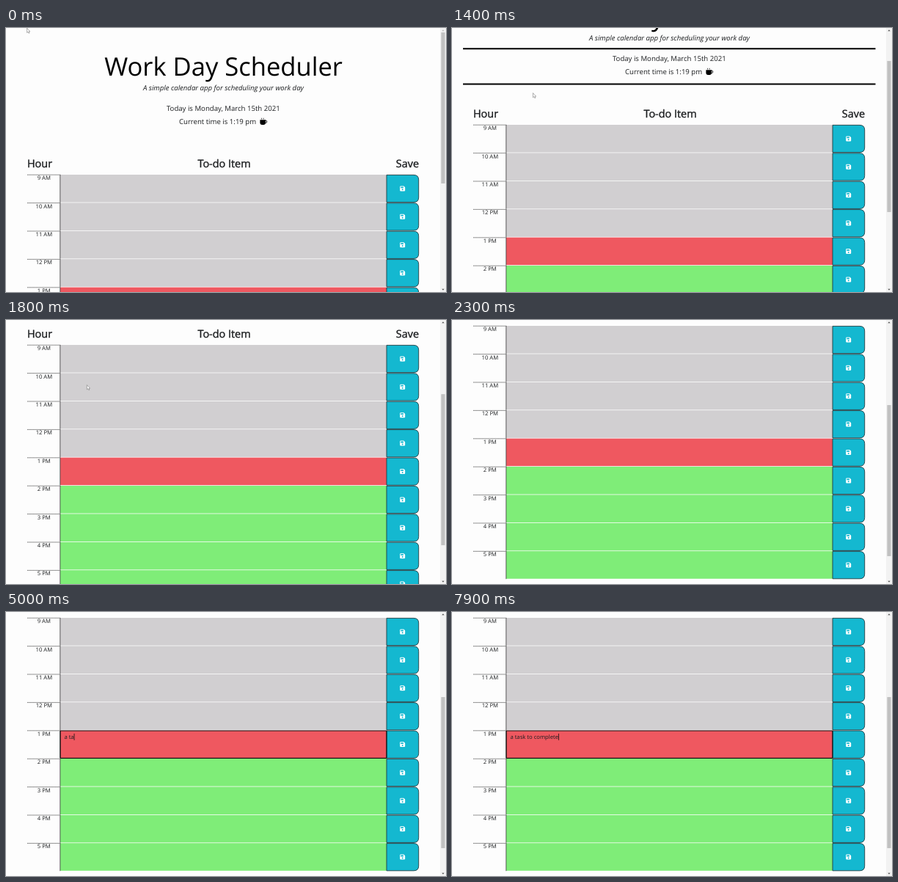
Write an HTML page that moves like this. It is 600 px wide and 360 px high and loops after 8000 ms.

```html
<!DOCTYPE html>
<html lang="en">
<head>
<meta charset="utf-8">
<title>Work Day Scheduler</title>
<style>
  html, body { margin: 0; width: 100%; height: 100%; overflow: hidden; background: #fdfdfd; }
  svg { display: block; width: 600px; height: 360px; }
  text { font-family: "Open Sans", sans-serif; fill: #1c1e20; text-rendering: geometricPrecision; white-space: pre; }
  .mid { text-anchor: middle; }
  .head { font-size: 14.4px; stroke: #1c1e20; stroke-width: .4px; }
  .lead { font-size: 9.6px; }
  .small { font-size: 7.68px; }
</style>
</head>
<body>
<svg viewBox="0 0 600 360">
  <defs>
    <path id="disk" fill="#fff" fill-rule="evenodd"
      d="M1 0H5.2L7 1.8V6Q7 7 6 7H1Q0 7 0 6V1Q0 0 1 0ZM1 1V2.8H4.8V1ZM3.5 3.9A1 1 0 1 0 3.5 5.9A1 1 0 1 0 3.5 3.9Z"/>
  </defs>
  <rect width="600" height="360" fill="#fdfdfd"/>
  <g id="page">
    <text class="mid" x="296.5" y="65" font-size="34.56" style="fill:#000">Work Day Scheduler</text>
    <text class="mid lead" x="296.5" y="84.5" font-style="italic">A simple calendar app for scheduling your work day</text>
    <path id="rules" d="M15 96.2H577.5M15 144.4H577.5" stroke="#000" stroke-width="2"/>
    <text class="mid lead" x="296.3" y="113.3">Today is Monday, March 15th 2021</text>
    <text class="lead" x="236" y="130.6">Current time is 1:19 pm</text>
    <g id="mug">
      <path d="M346.4 125.2H354V129.6Q354 132 351.6 132H348.8Q346.4 132 346.4 129.6Z"/>
      <path d="M353.6 126.2H354.6Q355.6 126.2 355.6 127.2V128.2Q355.6 129.4 354.4 129.4H353.6" fill="none" stroke="#000"/>
      <path d="M348.6 124.4V122.8M351.2 124.4V122.8" stroke="#000" stroke-width=".8"/>
    </g>
    <text class="head" x="29" y="190">Hour</text>
    <text class="head mid" x="297.5" y="190">To-do Item</text>
    <text class="head" x="563" y="190" text-anchor="end">Save</text>
    <g id="rows"></g>
    <g id="focus">
      <rect x="74" y="354" width="445" height="37.3" rx=".8" fill="none" stroke="#151515" stroke-width="1.2"/>
      <path id="caret" d="M0 357.8V366.8" stroke="#111" stroke-width=".8"/>
    </g>
    <text id="task" class="small" x="79.4" y="364.9"></text>
  </g>
  <rect x="592" width="8" height="360" fill="#f2f2f2"/>
  <rect id="thumb" x="593.4" y="6" width="5.2" height="206" fill="#c1c1c1"/>
  <path id="up" d="M594.3 4.2L596 2.2L597.7 4.2Z"/>
  <path d="M594.3 355.8L596 357.8L597.7 355.8Z" fill="#555"/>
  <path id="mouse" d="M0 0V6.2L1.4 5L2.4 7L3.4 6.6L2.5 4.6H4.2Z" fill="#fff" stroke="#777" stroke-width=".6"/>
</svg>
<script>
const $ = id => document.getElementById(id);
const LOOP = 8000, STEP = 100, TOP = 200, PITCH = 38.4;
const GREY = '#d1cfd1', RED = '#ef5860', GREEN = '#7fed78', TEAL = '#14b8d0';

function row(i) {
  const y = TOP + i * PITCH, hour = 9 + i;
  const label = `${hour > 12 ? hour - 12 : hour} ${hour < 12 ? 'AM' : 'PM'}`;
  const fill = hour < 13 ? GREY : hour > 13 ? GREEN : RED;
  return `<path d="M29 ${y + .2}H74" stroke="#222" stroke-width=".7" stroke-dasharray="1.4 .6"/>
    <text class="small mid" x="51.8" y="${y + 7.2}">${label}</text>
    <rect x="74" y="${y}" width="445" height="${PITCH - .8}" fill="${fill}"/>
    <path d="M73.8 ${y}v${PITCH - .4}" stroke="#333" stroke-width=".8"/>
    <path d="M519 ${y + .4}H556Q562.7 ${y + .4} 562.7 ${y + 7}V${y + 31}Q562.7 ${y + 37.6} 556 ${y + 37.6}H519Z"
      fill="${TEAL}" stroke="#1d3a40" stroke-width=".9"/>
    <use href="#disk" x="537.2" y="${y + 15.4}"/>`;
}
$('rows').innerHTML = Array.from({ length: 9 }, (_, i) => row(i)).join('');

// [time, value] steps
const SCROLL = [[1000, 0], [1100, 25.2], [1200, 58], [1300, 64], [1400, 68], [1500, 100],
  [1600, 124], [1700, 134], [1800, 166], [1900, 188], [2000, 192]];
const WORDS = 'a task to complete';
const KEYS = [4600, 4700, 4900, 5000, 5100, 5300, 5500, 5700, 5800,
  6000, 6200, 6400, 6500, 6800, 7000, 7200, 7400, 7500];
const FOCUS = 4000, BLINK = 530;

function at(steps, t) {
  const n = steps.findIndex(s => s[0] > t);
  if (n === 0) return steps[0][1];
  if (n < 0) return steps[steps.length - 1][1];
  const [a, b] = [steps[n - 1], steps[n]];
  return a[1] + (b[1] - a[1]) * (t - a[0]) / (b[0] - a[0]);
}
const show = (id, on) => $(id).setAttribute('visibility', on ? 'inherit' : 'hidden');

function draw(t) {
  const scroll = at(SCROLL, t);
  $('page').setAttribute('transform', `translate(0 ${-scroll})`);
  $('thumb').setAttribute('y', 6 + scroll * .573);
  $('up').setAttribute('fill', scroll ? '#555' : '#bbb');
  show('rules', t >= 100);

  const p = Math.min(1, t / 900), k = p * p * (3 - 2 * p);
  $('mouse').setAttribute('transform', `translate(${28.6 + 81.8 * k} ${.2 + 88.4 * k})`);
  show('mouse', t < 2000);

  const typed = KEYS.filter(key => key <= t);
  $('task').textContent = WORDS.slice(0, typed.length);
  const last = typed.length ? typed[typed.length - 1] : FOCUS;
  show('focus', t >= FOCUS);
  show('caret', t >= FOCUS && Math.floor((t - last) / BLINK) % 2 === 0);
  const width = typed.length ? $('task').getComputedTextLength() : 0;
  $('caret').setAttribute('transform', `translate(${79.8 + width} 0)`);
}

function tick() {
  const t = performance.now() % LOOP;
  draw(Math.floor(t / STEP) * STEP);
  requestAnimationFrame(tick);
}
tick();
</script>
</body>
</html>
```
